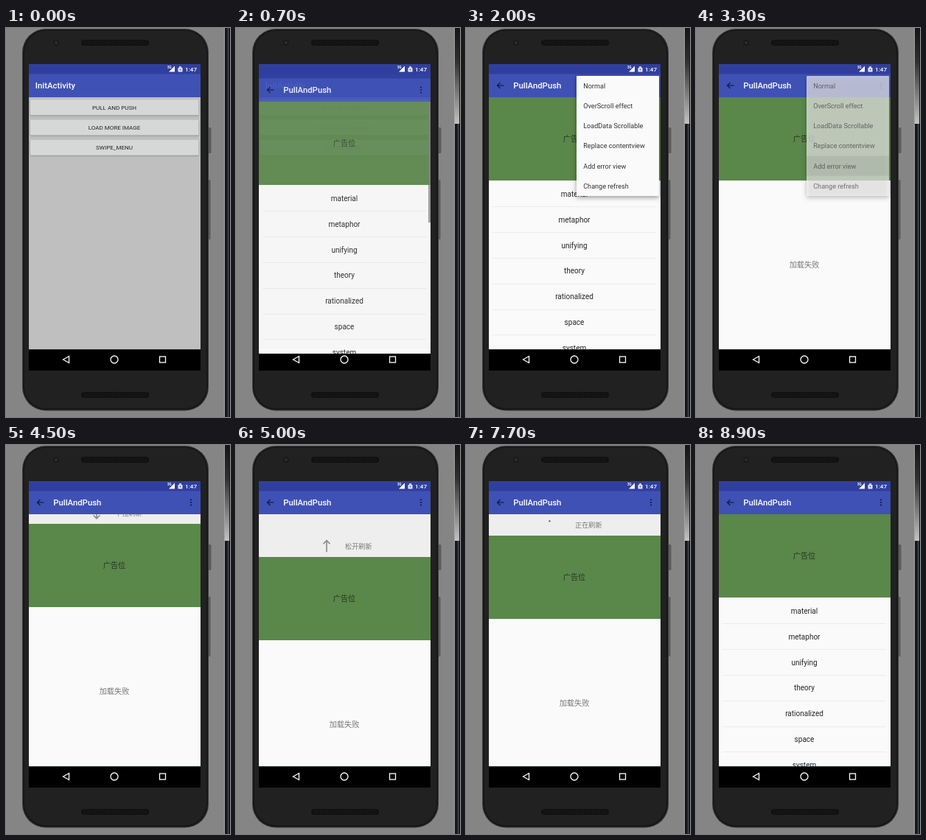
Animation of 304 by 528 pixels, one loop 9 s. Source, as an HTML page with a canvas:

```html
<!DOCTYPE html>
<html lang="en">
<head>
<meta charset="utf-8">
<title>Pull and push</title>
<style>
html, body { margin: 0; width: 100%; height: 100%; overflow: hidden; background: #858585; }
canvas { display: block; }
</style>
</head>
<body>
<canvas id="stage" width="304" height="528"></canvas>
<script>
const ctx = document.getElementById('stage').getContext('2d');
const LOOP = 9000, STEP = 100;
const SCREEN = { x: 31, y: 49, w: 233, h: 416 };
const TOP = 94, BOTTOM = 436, AD_HEIGHT = 113, HEADER = 28.5, ROW = 34.8;
const CENTER = 147;
const LATIN = 'Roboto, "Noto Sans", sans-serif';
const HAN = '"Noto Sans CJK SC", "Noto Sans CJK", sans-serif';
const WORDS = ['material', 'metaphor', 'unifying', 'theory', 'rationalized', 'space', 'system'];
const MENU = ['Normal', 'OverScroll effect', 'LoadData Scrollable', 'Replace contentview',
  'Add error view', 'Change refresh'];

const clamp = v => Math.max(0, Math.min(1, v));
const progress = (t, from, to) => clamp((t - from) / (to - from));
const smooth = p => p * p * (3 - 2 * p);
const easeOut = p => 1 - (1 - p) * (1 - p);

function rect(x, y, w, h, color) {
  ctx.fillStyle = color;
  ctx.fillRect(x, y, w, h);
}

function rounded(x, y, w, h, r, color) {
  ctx.beginPath();
  ctx.roundRect(x, y, w, h, r);
  ctx.fillStyle = color;
  ctx.fill();
}

function disc(x, y, r, color) {
  ctx.beginPath();
  ctx.arc(x, y, r, 0, Math.PI * 2);
  ctx.fillStyle = color;
  ctx.fill();
}

function line(points, color, width, closed) {
  ctx.beginPath();
  points.forEach(([x, y]) => ctx.lineTo(x, y));
  if (closed) ctx.closePath();
  ctx.strokeStyle = color;
  ctx.lineWidth = width;
  ctx.stroke();
}

function label(text, x, y, size, color, { align = 'left', weight = 400, family = LATIN } = {}) {
  ctx.font = `${weight} ${size}px ${family}`;
  ctx.textAlign = align;
  ctx.textBaseline = 'alphabetic';
  ctx.fillStyle = color;
  ctx.fillText(text, x, y + size * 0.36);
}

const centered = { align: 'center' };
const han = { align: 'center', family: HAN };

function withState(draw) {
  ctx.save();
  draw();
  ctx.restore();
}

function clipTo(x, y, w, h) {
  ctx.beginPath();
  ctx.rect(x, y, w, h);
  ctx.clip();
}

function speaker(y) {
  rounded(102, y, 92, 8, 4, '#101010');
  for (let row = 0; row < 3; row++)
    for (let x = 105; x < 192; x += 3) rect(x + row % 2, y + 1.5 + row * 2, 1, 1, '#262626');
}

function drawEdge(t) {
  rect(296, 0, 1, 528, '#a4a4a4');
  rect(297, 0, 7, 528, '#15191f');
  rect(301, 0, 1, 528, '#59616b');
  if (t < 300) return;
  const shade = ctx.createLinearGradient(0, 0, 0, 130);
  shade.addColorStop(0, '#151515');
  shade.addColorStop(0.35, '#303030');
  shade.addColorStop(1, '#c4c4c4');
  rect(297, 0, 6, 130, shade);
}

function drawPhone(t) {
  rect(0, 0, 304, 528, '#858585');
  drawEdge(t);
  rounded(273, 135, 5.5, 35, 1.5, '#5c5c5c');
  rounded(273, 206, 4.5, 81, 1.5, '#5c5c5c');
  rounded(22, 1, 253, 518.5, 32, '#3a3a3a');
  rounded(23, 2, 251, 516.5, 31, '#181818');
  rounded(25, 4, 247, 512, 29, '#212121');
  disc(68, 20, 4, '#1a1a1a');
  disc(68, 20, 1.7, '#30343a');
  speaker(16);
  speaker(494);
}

function drawBars(title, titleX) {
  rect(SCREEN.x, SCREEN.y, SCREEN.w, 14, '#303f9f');
  rect(SCREEN.x, 62.5, SCREEN.w, TOP - 62.5, '#3f51b5');
  label(title, titleX, 78, 11.36, '#fff', { weight: 500 });
}

function drawInit(t) {
  rect(SCREEN.x, TOP, SCREEN.w, BOTTOM - TOP, '#bfbfbf');
  drawBars('InitActivity', 39.8);
  ['PULL AND PUSH', 'LOAD MORE IMAGE', 'SWIPE_MENU'].forEach((text, i) => {
    const y = 107.7 + i * 27.27;
    withState(() => {
      ctx.shadowColor = 'rgba(0,0,0,.25)';
      ctx.shadowBlur = 2;
      ctx.shadowOffsetY = 1;
      rounded(33, y - 10.5, 228.5, 21, 1, '#d6d7d7');
    });
    if (i === 0 && t >= 300) {
      withState(() => {
        clipTo(33, y - 10.5, 228.5, 21);
        disc(CENTER, y, t < 400 ? 70 : 130, 'rgba(0,0,0,.1)');
      });
    }
    label(text, CENTER, y, 8.05, '#252525', centered);
  });
}

function pullOffset(t) {
  if (t < 4500) return 0;
  if (t <= 4900) return 13 + 45 * easeOut(progress(t, 4500, 4900));
  if (t < 7800) return 58 - (58 - HEADER) * smooth(progress(t, 5000, 5400));
  return HEADER * (1 - smooth(progress(t, 7700, 8200)));
}

function drawSpinner(t, x, y) {
  // A dot grows to three quarters of a turn, then its tail catches up.
  const cycle = 1333.3, since = t - 7700;
  const u = ((since / cycle) % 1 + 1) % 1;
  const head = 0.75 * smooth(clamp(u * 2));
  const tail = 0.75 * smooth(clamp(u * 2 - 1));
  const base = (202 + since * 0.108) / 360 + u * 0.25;
  const turn = Math.PI * 2;
  ctx.beginPath();
  ctx.arc(x, y, 10.7, (base + tail) * turn, (base + Math.max(head, tail + 0.03)) * turn);
  ctx.strokeStyle = '#009688';
  ctx.lineWidth = 2.3;
  ctx.stroke();
}

function drawHeader(t, offset) {
  rect(SCREEN.x, TOP, SCREEN.w, offset, '#eee');
  const y = TOP + offset - HEADER / 2 - 0.5;
  const refreshing = t >= 5300 && t < 7800;
  const ready = offset > HEADER;
  const text = refreshing ? '正在刷新' : t >= 7800 ? '刷新完成' : ready ? '松开刷新' : '下拉刷新';
  label(text, 166.3, y, 9.1, '#777', han);
  if (refreshing) drawSpinner(t, 123, y);
  else if (t < 5300) withState(() => {
    ctx.translate(123, y);
    if (ready) ctx.rotate(Math.PI);
    line([[0, -8], [0, 7]], '#888', 1.6);
    line([[-4.5, 3], [0, 7.5], [4.5, 3]], '#888', 1.6);
  });
}

function drawScrollbar(t) {
  const alpha = t < 3100 ? 1 - progress(t, 1500, 1700)
    : t >= 7800 ? 1 - progress(t, 8600, 8900) : 0;
  if (alpha) rect(261, TOP, 3, 164, `rgba(125,125,125,${alpha * 0.75})`);
}

function drawContent(t) {
  const offset = Math.round(pullOffset(t));
  const adTop = TOP + offset, listTop = adTop + AD_HEIGHT;
  const failed = t >= 3300 && t < 7800;
  withState(() => {
    clipTo(SCREEN.x, TOP, SCREEN.w, BOTTOM - TOP);
    rect(SCREEN.x, TOP, SCREEN.w, BOTTOM - TOP, '#fafafa');
    if (offset) drawHeader(t, offset);
    rect(SCREEN.x, adTop, SCREEN.w, AD_HEIGHT, '#5a874a');
    label('广告位', CENTER, adTop + AD_HEIGHT / 2, 10.1, 'rgba(0,0,0,.6)', han);
    if (failed) {
      label('加载失败', CENTER, offset + 321.8, 10.2, '#777', han);
    } else {
      WORDS.forEach((word, i) => {
        label(word, CENTER, listTop + 18.4 + i * ROW, 10, '#252525', centered);
        rect(36, Math.round(listTop + 35.4 + i * ROW), 222, 1, '#ececec');
      });
    }
    drawScrollbar(t);
  });
}

function drawMenu(t) {
  if (t >= 1600 && t < 1900) disc(251, 78, 13, 'rgba(255,255,255,.16)');
  if (t < 1700 || t >= 3500) return;
  const open = easeOut(progress(t, 1600, 2000));
  const alpha = Math.min(open, 1 - progress(t, 3200, 3500));
  const height = 163 * (0.35 + 0.65 * open), width = 112 * (0.6 + 0.4 * open);
  withState(() => {
    ctx.globalAlpha = alpha;
    withState(() => {
      ctx.shadowColor = 'rgba(0,0,0,.4)';
      ctx.shadowBlur = 6;
      ctx.shadowOffsetY = 2;
      rounded(262 - width, 65, width, height, 1, '#fafafa');
    });
    clipTo(262 - width, 65, width, height);
    if (t >= 3100) withState(() => {
      clipTo(150, 173.5, 112, 27.3);
      disc(206, 187, t < 3200 ? 35 : 90, 'rgba(0,0,0,.1)');
    });
    MENU.forEach((text, i) => label(text, 159.2, 78.3 + i * 27.27, 9.1, '#333'));
  });
}

function drawPull(t) {
  drawContent(t);
  drawBars('PullAndPush', 64.2);
  const dark = 'rgba(10,12,35,.8)';
  line([[51.5, 78], [42.5, 78]], dark, 1.2);
  line([[46.5, 74], [42.5, 78], [46.5, 82]], dark, 1.2);
  [-3.5, 0, 3.5].forEach(dy => disc(251, 78 + dy, 1.1, dark));
  drawMenu(t);
}

function drawActivities(t) {
  const remaining = 1 - progress(t, 700, 900);
  if (remaining) drawInit(t);
  if (t < 700) return;
  withState(() => {
    ctx.translate(0, Math.round(6 * remaining ** 2));
    drawPull(t);
  });
  // The old page still shows faintly through the new one.
  if (remaining) withState(() => {
    ctx.globalAlpha = 0.07 * remaining;
    drawInit(t);
  });
}

function drawStatus() {
  label('3G', 219, 53, 4.5, '#fff', { weight: 700 });
  ctx.beginPath();
  [[229, 51.5], [229, 59.5], [221, 59.5]].forEach(([x, y]) => ctx.lineTo(x, y));
  ctx.fillStyle = '#fff';
  ctx.fill();
  rounded(233.5, 54, 6, 5.5, 0.6, '#e8eaf6');
  rect(235, 52, 3, 2, '#c5cae9');
  rect(235.7, 55.5, 1.6, 2, '#4b59ad');
  label('1:47', 243.1, 55.7, 8.1, '#fff', { weight: 500 });
}

function drawNavIcons() {
  line([[77.5, 450], [85.5, 445.5], [85.5, 454.5]], '#fff', 1.3, true);
  ctx.beginPath();
  ctx.arc(CENTER, 450, 5, 0, Math.PI * 2);
  ctx.stroke();
  ctx.strokeRect(208.5, 446, 8, 8);
}

function draw(t) {
  drawPhone(t);
  withState(() => {
    clipTo(SCREEN.x, SCREEN.y, SCREEN.w, SCREEN.h);
    rect(SCREEN.x, BOTTOM, SCREEN.w, 29, '#000');
    rect(SCREEN.x, BOTTOM, SCREEN.w, 1, '#1c2a2a');
    drawActivities(t);
    drawStatus();
    drawNavIcons();
  });
}

const start = performance.now();
function frame() {
  const elapsed = (performance.now() - start) % LOOP;
  draw(Math.floor(elapsed / STEP) * STEP);
  requestAnimationFrame(frame);
}
frame();
</script>
</body>
</html>
```
